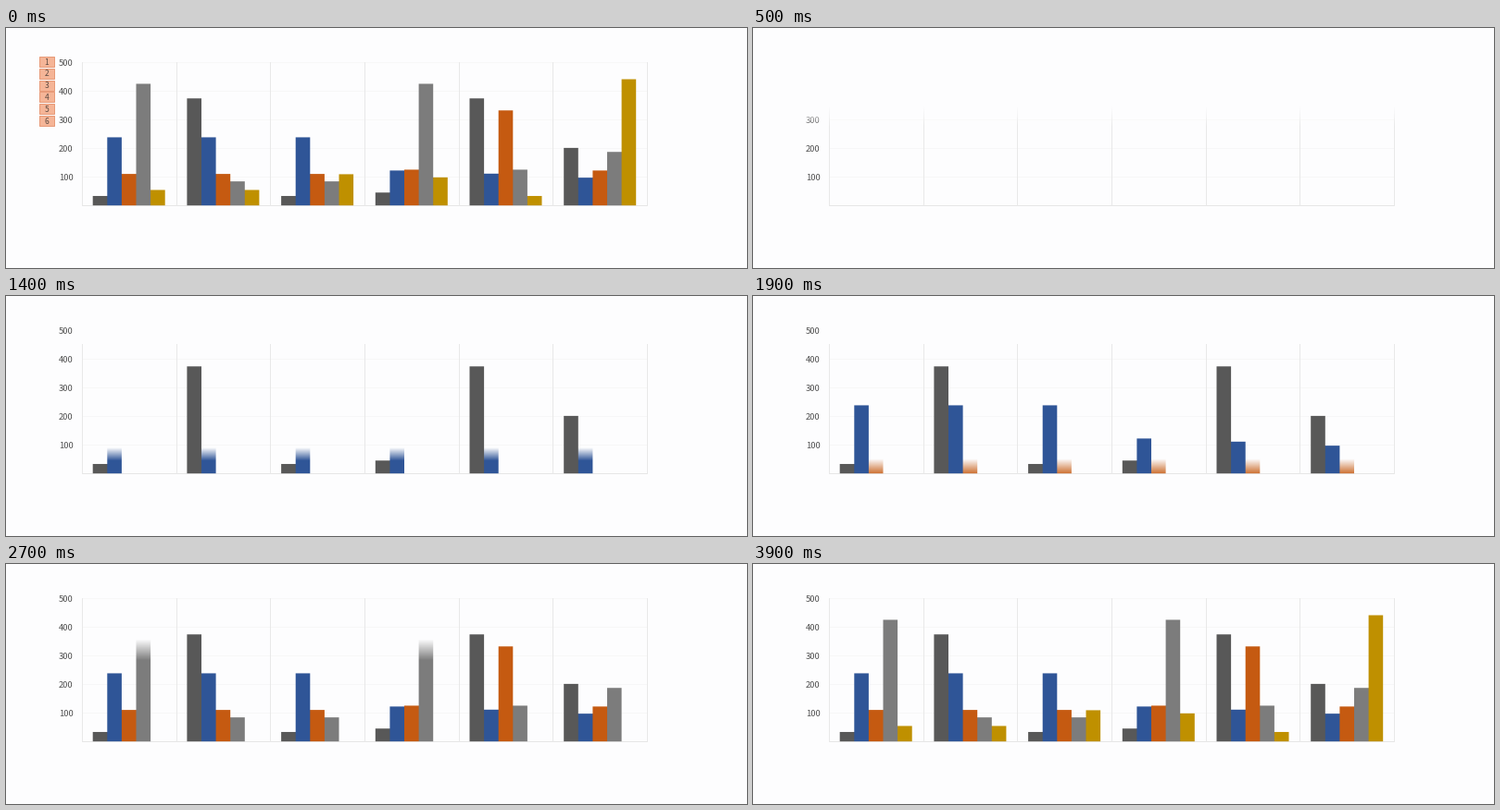
Write a matplotlib script that moves like this. It is 800 px wide and 260 px high and loops after 4000 ms.

```python
import numpy as np
import matplotlib.pyplot as plt
from matplotlib.animation import FuncAnimation
from matplotlib.colors import to_rgb
from matplotlib.patches import Rectangle

W, H, DPI = 800, 260, 100
FRAMES, STEP = 40, 100
BG = np.array(to_rgb("#fdfdfe"))
BASE, UNIT = 192.2, 0.31          # y of zero, pixels per value
LEFT, PITCH, BAR = 82, 101.7, 15.6
WIPE = 500
GRID_START = 205

# colour, wipe start in ms, one value per group
SERIES = [
    ("#585858", 740, [33, 374, 33, 45, 374, 201]),
    ("#2f5597", 1241, [238, 238, 238, 122, 111, 97]),
    ("#c55a11", 1835, [110, 110, 110, 125, 332, 122]),
    ("#7c7c7c", 2342, [425, 84, 84, 425, 125, 187]),
    ("#bf9000", 2847, [54, 54, 109, 98, 33, 441]),
]

xs = np.arange(W)
ys = np.arange(H)


def cover(cells, lo, hi):
    """Share of each pixel cell lying between lo and hi."""
    return np.clip(np.minimum(cells + 1, hi) - np.maximum(cells, lo), 0, 1)


def wipe(t, start, bottom, height, edge):
    """Soft-edged opacity per pixel row for a wipe from the bottom up."""
    if t == 0:
        return np.ones(H)
    p = np.clip((t - start) / WIPE, 0, 1)
    lead = bottom - (height + edge) * p
    return np.clip((ys + 0.5 - lead) / edge, 0, 1) * (p > 0)


def series_mask(index, values):
    mask = np.zeros((H, W))
    for group, value in enumerate(values):
        x = LEFT + 11.7 + group * PITCH + index * BAR
        mask += np.outer(cover(ys, BASE - value * UNIT, BASE), cover(xs, x, x + BAR))
    return mask


def grid_layer(full):
    """Plot lines as colour differences from the background."""
    layer = np.zeros((H, W, 3))
    right = round(LEFT + 6 * PITCH)
    for value in range(100, 600 if full else 500, 100):
        layer[round(BASE - value * UNIT), LEFT:right + 1] = to_rgb("#f7f7f7") - BG
    layer[192, LEFT:right + 1] = to_rgb("#e6e6e6") - BG
    top = 37 if full else 52
    for i in range(7):
        layer[top:193, round(LEFT + i * PITCH)] = to_rgb("#e8e8e8") - BG
    return layer


masks = [series_mask(i, s[2]) for i, s in enumerate(SERIES)]
grids = {full: grid_layer(full) for full in (False, True)}


def paint(t):
    rows = wipe(t, GRID_START, 193, 161, 22)
    img = BG + grids[t == 0 or t >= 2700] * rows[:, None, None]
    total, ink = np.zeros((H, W)), np.zeros((H, W, 3))
    for (color, start, values), mask in zip(SERIES, masks):
        height = max(values) * UNIT
        m = mask * wipe(t, start, BASE, height, 0.15 * height + 3)[:, None]
        total += m
        ink += m[..., None] * np.array(to_rgb(color))
    img = img * (1 - total[..., None]) + ink
    return np.clip(img, 0, 1), rows


fig = plt.figure(figsize=(W / DPI, H / DPI), dpi=DPI, facecolor=BG)
ax = fig.add_axes([0, 0, 1, 1])
extent = (0, W, H, 0)
plot = ax.imshow(np.ones((H, W, 3)), extent=extent, interpolation="nearest",
                 aspect="auto", zorder=1)
veil = ax.imshow(np.ones((H, 1, 4)), extent=(52, 80, H, 0), interpolation="nearest",
                 aspect="auto", zorder=3)
ax.set(xlim=(0, W), ylim=(H, 0))
ax.axis("off")


def label(x, y, text, size, color, ha, zorder):
    return ax.text(x, y, text, fontsize=size * 72 / DPI, color=color, ha=ha,
                   va="baseline", family="Noto Sans CJK JP", zorder=zorder)


for value in range(100, 600, 100):
    label(72.6, BASE - value * UNIT + 3.4, str(value), 9.4, "#505050", "right", 2)

tags = []
for i in range(6):
    y = 31 + i * 12.8
    tags.append(ax.add_patch(Rectangle((36, y), 16, 11, fc="#f5b597", ec="#e79a78",
                                       lw=0.72, zorder=4)))
    tags.append(label(44, y + 8.7, str(i + 1), 8.4, "#5c4a42", "center", 5))


def draw(k):
    t = k * STEP
    img, rows = paint(t)
    plot.set_data(img)
    shade = np.empty((H, 1, 4))
    shade[..., :3] = BG
    shade[:, 0, 3] = 1 - rows
    veil.set_data(shade)
    for tag in tags:
        tag.set_visible(t == 0)
    return [plot, veil, *tags]


anim = FuncAnimation(fig, draw, frames=FRAMES, interval=STEP, repeat=True,
                     repeat_delay=0, init_func=lambda: draw(0))
plt.show()
```
